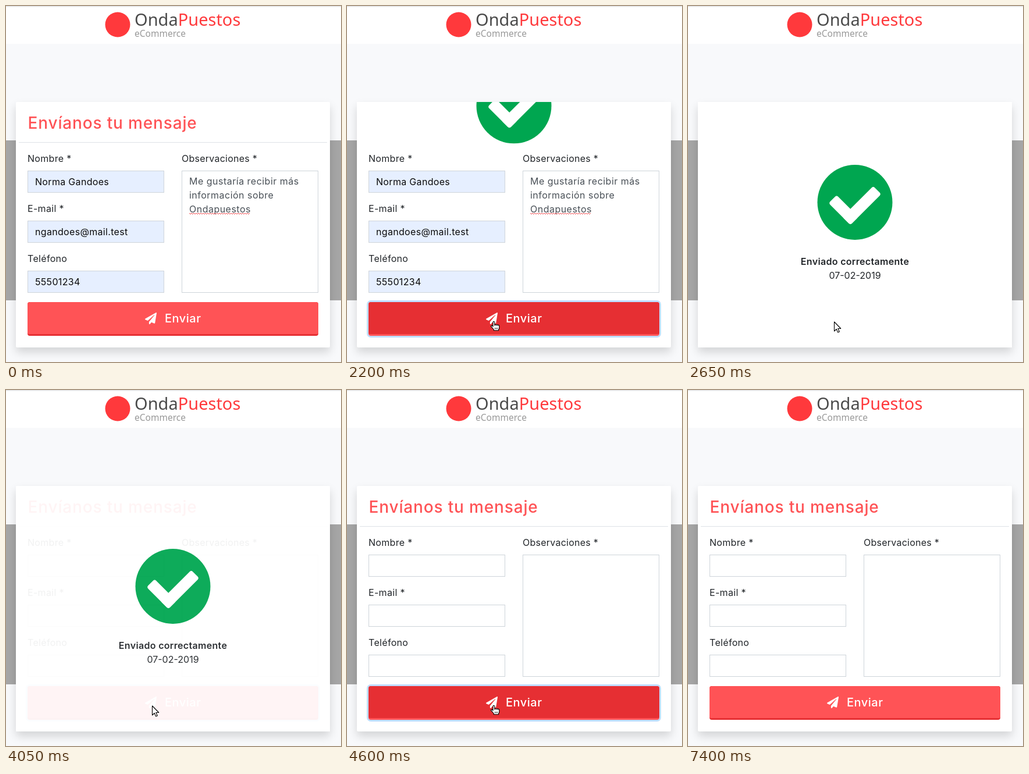
Animation, 576 px wide and 612 px high, one loop 7.45 s. Source, as an HTML page with a canvas:

```html
<!DOCTYPE html>
<html lang="es">
<head>
<meta charset="utf-8">
<title>Formulario de contacto</title>
<style>
  html, body { margin: 0; width: 100%; height: 100%; overflow: hidden; background: #f8f9fb; }
  canvas { display: block; }
</style>
</head>
<body>
<canvas id="stage" width="576" height="612"></canvas>
<script>
const LOOP = 7450, STEP = 50;
const CARD = { x: 17, y: 165, w: 540, h: 422 };
const RED = [255, 83, 86], DARK_RED = [230, 47, 51];
const SANS = 'Inter, "Open Sans", sans-serif';
const LOGO = '"Noto Sans", "Open Sans", sans-serif';

const stage = document.getElementById('stage').getContext('2d');
const layer = document.createElement('canvas');
layer.width = 576;
layer.height = 612;
const panel = layer.getContext('2d');

const plane = new Path2D('M476 3.2L12.5 270.6c-18.1 10.4-15.8 35.6 2.2 43.2L121 358.4l287.3-253.2c5.5-4.9 13.3 2.6 8.6 8.3L176 407v80.5c0 23.6 28.5 32.9 42.5 15.8L282 426l124.6 52.2c14.2 6 30.4-2.9 33-18.2l72-432C515 7.8 493.3-6.8 476 3.2z');
const arrow = new Path2D('M.5 1V17l3.7-3.5 2.5 5.6 2.6-1.1-2.5-5.5h4.9z');
const hand = new Path2D('M4 9V1.8a1.4 1.4 0 0 1 2.8 0V6q1.6-.9 2.6.1 1.7-.8 2.6.4 2.5-.4 2.8 1.4V11q-.2 2-1.2 3v1.7H5.3V14Q3.5 12 .7 9.2 .7 7.2 2.4 7.4z');
const fingers = new Path2D('M6.8 6v2.2M9.4 6.2v2M12 6.7v1.5M7.5 11v2.6M9.5 11v2.6M11.5 11v2.6');

const clamp = v => Math.min(1, Math.max(0, v));
const ramp = (t, from, to) => clamp((t - from) / (to - from));
const swing = p => 0.5 - Math.cos(p * Math.PI) / 2;
const lerp = (a, b, p) => a + (b - a) * p;
const mix = (a, b, p) => `rgb(${a.map((v, i) => Math.round(lerp(v, b[i], p)))})`;

function text(c, str, x, y, { size = 16, weight = 400, color = '#212529', font = SANS, align = 'left', track = 0.02 } = {}) {
  c.font = `${weight} ${size}px ${font}`;
  c.letterSpacing = `${size * track}px`;
  c.fillStyle = color;
  c.textAlign = align;
  c.fillText(str, x, y);
  return c.measureText(str).width;
}

function rect(c, x, y, w, h, color) {
  c.fillStyle = color;
  c.fillRect(x, y, w, h);
}

function rounded(c, x, y, w, h, r, color) {
  c.beginPath();
  c.roundRect(x, y, w, h, r);
  c.fillStyle = color;
  c.fill();
}

function disc(c, x, y, r, color) {
  c.beginPath();
  c.arc(x, y, r, 0, Math.PI * 2);
  c.fillStyle = color;
  c.fill();
}

function box(c, x, y, w, h, fill) {
  rect(c, x, y, w, h, fill);
  c.strokeStyle = '#ced4da';
  c.lineWidth = 1;
  c.strokeRect(x + 0.5, y + 0.5, w - 1, h - 1);
}

function drawPage(c) {
  rect(c, 0, 0, 576, 612, '#f8f9fb');
  rect(c, 0, 0, 576, 65, '#fff');
  rect(c, 0, 0, 576, 1.5, '#e4e5e7');
  rect(c, 0, 231, 576, 275, '#a6a6a6');

  disc(c, 192, 32, 21.5, '#ff393c');
  const logo = { size: 29, font: LOGO, track: 0 };
  const w = text(c, 'Onda', 221, 34, { ...logo, color: '#4a4a4a' });
  text(c, 'Puestos', 221 + w, 34, { ...logo, color: '#ff393c' });
  text(c, 'eCommerce', 221, 53, { size: 15.5, font: LOGO, track: 0, color: '#999' });

  c.save();
  c.shadowColor = 'rgba(0,0,0,.15)';
  c.shadowBlur = 16;
  c.shadowOffsetY = 8;
  rounded(c, CARD.x, CARD.y, CARD.w, CARD.h, 2, '#fff');
  c.restore();
}

function squiggle(c, x, y, w) {
  c.beginPath();
  c.moveTo(x, y);
  for (let i = 2; i <= w; i += 2) c.lineTo(x + i, y + (i % 4 ? 2 : 0));
  c.strokeStyle = '#f0383c';
  c.lineWidth = 0.9;
  c.stroke();
}

function drawForm(c, filled) {
  text(c, 'Envíanos tu mensaje', 37.5, 211, { size: 28, weight: 500, color: '#ff5356', track: 0.03 });
  rect(c, 22, 234, 530, 1, '#dee2e6');

  const fields = [['Nombre *', 'Norma Gandoes'], ['E-mail *', 'ngandoes@mail.test'], ['Teléfono', '55501234']];
  fields.forEach(([label, value], i) => {
    const y = 283 + i * 86;
    text(c, label, 37, y - 15);
    box(c, 37, y, 235, 38, filled ? '#e6efff' : '#fff');
    if (filled) text(c, value, 50, y + 25, { color: '#0c0c0c' });
  });

  text(c, 'Observaciones *', 302, 268, { track: 0.015 });
  box(c, 302, 283, 235, 210, '#fff');
  if (!filled) return;
  const note = { color: '#495057', track: 0.03 };
  text(c, 'Me gustaría recibir más', 315, 307, note);
  text(c, 'información sobre', 315, 331, note);
  squiggle(c, 315, 356, text(c, 'Ondapuestos', 315, 355, note));
}

function drawButton(c, hover, focus) {
  if (focus > 0) {
    const s = 3 * focus;
    rounded(c, 37 - s, 509 - s, 500 + 2 * s, 58 + 2 * s, 4 + s, `rgba(0,123,255,${0.25 * focus})`);
  }
  rounded(c, 37, 509, 500, 58, 4, mix(DARK_RED, RED, hover));
  rounded(c, 37, 509, 500, 55, [4, 4, 2, 2], mix(RED, DARK_RED, hover));
  c.save();
  c.translate(239, 527);
  c.scale(20 / 512, 20 / 512);
  c.fillStyle = '#fff';
  c.fill(plane);
  c.restore();
  text(c, 'Enviar', 273, 544, { size: 20, weight: 500, color: '#fff', track: 0.025 });
}

// The notice stays centred in the panel while the panel grows.
function drawNotice(c, height, alpha) {
  const p = panel, mid = CARD.y + height / 2, cx = 287;
  p.clearRect(0, 0, 576, 612);
  p.save();
  p.beginPath();
  p.rect(CARD.x, CARD.y, CARD.w, height);
  p.clip();
  rect(p, CARD.x, CARD.y, CARD.w, height, '#fff');
  const cy = mid - 38.5;
  disc(p, cx, cy, 64.5, '#00a650');

  // Tick: two bars of an L, turned by 45 degrees.
  p.save();
  p.translate(cx, cy);
  p.rotate(Math.PI / 4);
  rounded(p, -31, 13.5, 53, 19.5, 4, '#fff');
  rounded(p, 2.5, -42, 19.5, 75, 4, '#fff');
  p.restore();

  text(p, 'Enviado correctamente', cx, mid + 69, { weight: 600, align: 'center' });
  text(p, '07-02-2019', cx, mid + 93, { align: 'center', track: 0 });
  p.restore();

  c.globalAlpha = alpha;
  c.drawImage(layer, 0, 0);
  c.globalAlpha = 1;
}

function cursorAt(t) {
  if (t < 950 || t >= 6200) return null;
  if (t < 1450) {
    const p = ramp(t, 950, 1200), e = p * (2 - p);
    return [lerp(40, 251, e), lerp(592, 548, e)];
  }
  if (t < 6050) return [251, 542];
  const u = ramp(t, 6050, 6150);
  return [246 - 146 * u * u, 546 + 34 * u];
}

function drawCursor(c, t) {
  const pos = cursorAt(t);
  if (!pos) return;
  const pointing = (t >= 1450 && t < 2500) || (t >= 4400 && t < 6150);
  c.save();
  c.translate(Math.round(pos[0]) - (pointing ? 4 : 0), Math.round(pos[1]));
  c.lineJoin = 'round';
  c.lineWidth = 1.1;
  c.fillStyle = '#fff';
  c.strokeStyle = '#000';
  const shape = pointing ? hand : arrow;
  c.fill(shape);
  c.stroke(shape);
  c.lineWidth = 0.8;
  if (pointing) c.stroke(fingers);
  c.restore();
}

function hoverAt(t) {
  if (t < 1450) return 0;
  if (t < 3500) return 1 - ramp(t, 2490, 2640);
  if (t < 6000) return ramp(t, 4400, 4600);
  return 1 - ramp(t, 6150, 6350);
}

function draw(t) {
  const c = stage;
  drawPage(c);
  drawForm(c, t < 2650);
  drawButton(c, hoverAt(t), Math.min(ramp(t, 1750, 1900), 1 - ramp(t, 7300, 7400)));
  const open = swing(ramp(t, 2016, 2616));
  const alpha = 1 - swing(ramp(t, 3988, 4388));
  if (open > 0 && alpha > 0) drawNotice(c, CARD.h * open, alpha);
  drawCursor(c, t);
}

function tick() {
  const t = performance.now() % LOOP;
  draw(Math.floor(t / STEP) * STEP);
  requestAnimationFrame(tick);
}
tick();
</script>
</body>
</html>
```
